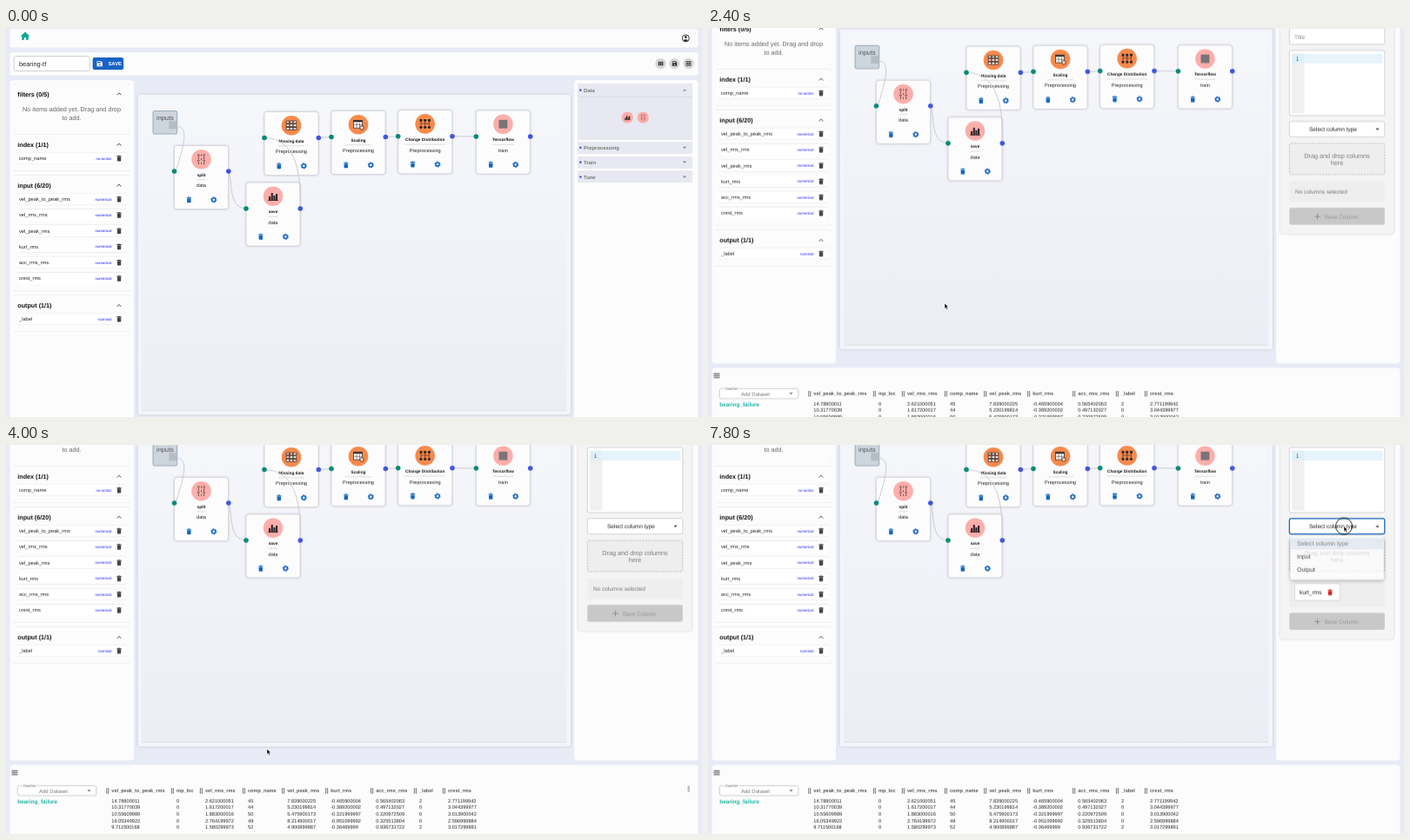
These frames come from a looping animation (800 by 448 pixels, 8000 ms). An HTML page:

```html
<!DOCTYPE html>
<html lang="en">
<head>
<meta charset="utf-8">
<title>Pipeline editor</title>
<style>
html, body { margin: 0; width: 100%; height: 100%; overflow: hidden; background: #e8eaf6; }
svg { display: block; width: 800px; height: 448px; }
text { font-family: "Liberation Sans", Arial, sans-serif; text-rendering: geometricPrecision; white-space: pre; }
.lift { filter: drop-shadow(0 .9px .5px #0004); }
.soft { filter: drop-shadow(0 .6px 1.2px #0003); }
.float { filter: drop-shadow(0 1.5px 2px #0006); }

.page, .pointer, .timed { animation: 8s step-end infinite; }
.page { animation-name: scroll; }
.pointer { animation-name: point; }
.palette { animation-name: palette; }
.form { animation-name: form; }
.empty { animation-name: empty; }
.filled { animation-name: filled; }
.picked { animation-name: picked; }
.ghost { animation-name: ghost; }
.ring { animation-name: ring; }
.arrow { animation-name: arrow; }
.plus { animation-name: plus; }
.bar { animation-name: bar; }
.focus { animation-name: focus; }
.menu { animation-name: menu; }

@keyframes scroll {
  0% { transform: translateY(0); }
  27.5% { transform: translateY(-30px); }
  30% { transform: translateY(-75.3px); }
  32.5% { transform: translateY(-94px); }
  35%, 37.5% { transform: translateY(-99px); }
  40%, 100% { transform: translateY(-98.2px); }
}
@keyframes point {
  0% { transform: translate(830px, 20px); }
  5% { transform: translate(792px, 30px); }
  7.5% { transform: translate(765px, 42px); }
  10% { transform: translate(753px, 42px); }
  15% { transform: translate(600px, 180px); }
  17.5% { transform: translate(300px, 325px); }
  20% { transform: translate(275px, 318px); }
  22.5% { transform: translate(272.6px, 316.7px); }
  30% { transform: translate(272px, 317px); }
  35% { transform: translate(272px, 322px); }
  37.5% { transform: translate(272px, 325px); }
  40% { transform: translate(274px, 328px); }
  50% { transform: translate(300px, 350px); }
  52.5% { transform: translate(345px, 380px); }
  55% { transform: translate(380px, 397px); }
  57.5% { transform: translate(387px, 398px); }
  65% { transform: translate(390px, 396px); }
  67.5% { transform: translate(440.5px, 345.5px); }
  70% { transform: translate(560px, 245px); }
  72.5% { transform: translate(650px, 175px); }
  75% { transform: translate(700px, 140px); }
  77.5% { transform: translate(710px, 134px); }
  87.5% { transform: translate(720px, 115px); }
  90% { transform: translate(728px, 100px); }
  92.5%, 100% { transform: translate(731px, 93.5px); }
}
@keyframes palette { 0% { opacity: 1; } 12.5%, 100% { opacity: 0; } }
@keyframes form { 0% { opacity: 0; } 12.5%, 100% { opacity: 1; } }
@keyframes empty { 0% { opacity: 1; } 80%, 100% { opacity: 0; } }
@keyframes filled { 0% { opacity: 0; } 80%, 100% { opacity: 1; } }
@keyframes picked { 0% { opacity: 0; } 65% { opacity: 1; } 85%, 100% { opacity: 0; } }
@keyframes ghost { 0% { opacity: 0; } 65% { opacity: 1; } 80%, 100% { opacity: 0; } }
@keyframes ring { 0% { opacity: 0; } 10% { opacity: 1; } 12.5% { opacity: 0; } 65% { opacity: 1; } 77.5% { opacity: 0; } 95%, 100% { opacity: 1; } }
@keyframes arrow { 0% { opacity: 1; } 80% { opacity: 0; } 85%, 100% { opacity: 1; } }
@keyframes plus { 0% { opacity: 0; } 80% { opacity: 1; } 85%, 100% { opacity: 0; } }
@keyframes bar { 0% { opacity: 0; } 40% { opacity: 1; } 85%, 100% { opacity: 0; } }
@keyframes focus { 0% { opacity: 0; } 95%, 100% { opacity: 1; } }
@keyframes menu { 0% { opacity: 0; } 97.5%, 100% { opacity: .72; } }
</style>
</head>
<body>
<svg id="stage" viewBox="0 0 800 448"></svg>
<script>
const rect = (x, y, w, h, fill, more = '') => `<rect x="${x}" y="${y}" width="${w}" height="${h}" fill="${fill}" ${more}/>`;
const circle = (x, y, r, fill, more = '') => `<circle cx="${x}" cy="${y}" r="${r}" fill="${fill}" ${more}/>`;
const path = (d, stroke, width = 1, fill = 'none', more = '') => `<path d="${d}" stroke="${stroke}" stroke-width="${width}" fill="${fill}" ${more}/>`;
const timed = (name, body) => `<g class="timed ${name}">${body}</g>`;
// y is the vertical middle of the line
const text = (x, y, s, size, fill = '#222', more = '') => `<text x="${x}" y="${y + size * .35}" font-size="${size}" fill="${fill}" ${more}>${s}</text>`;
const MID = 'text-anchor="middle" ', BOLD = 'font-weight="bold" ';

const trash = (x, y, fill = '#444') => path(`M${x - 2.7} ${y - 2.9}h1.5l.5-.6h1.4l.5.6h1.5v.9h-5.4zM${x - 2.2} ${y - 1.6}h4.4v4.2q0 .8-.8.8h-2.8q-.8 0-.8-.8z`, 'none', 0, fill);
const gear = (x, y) => circle(x, y, 2.1, 'none', 'stroke="#1565c0" stroke-width="1.5"') +
  circle(x, y, 3.1, 'none', 'stroke="#1565c0" stroke-width="1" stroke-dasharray="1.62"');
const chevron = (x, y) => path(`M${x - 2.3} ${y + 1.2}l2.3-2.4 2.3 2.4`, '#333', .9);
const caret = (x, y, dir = 1, fill = '#444') => path(`M${x - 2.2} ${y - dir}h4.4l-2.2 ${2.2 * dir}z`, 'none', 0, fill);
const dots = (x, y, fill = '#333') => [-2.2, 0, 2.2].map(d => circle(x - 1, y + d, .7, fill) + circle(x + 1, y + d, .7, fill)).join('');

const PINK = '#fcaeaa', ORANGE = '#f68a4c', INK = '#2b2326';
const outline = width => `stroke="${INK}" stroke-width="${width}"`;
const glyphs = {
  table: () => [-5.2, -1.4, 2.4].map(y => [-6, -1.9, 2.2].map(x => rect(x, y, 3.8, 2.7, x + y > -4 && x + y < 2 ? '#fff' : '#f6d9c6', outline(.7))).join('')).join(''),
  scaling: () => rect(-5.5, -5, 10, 9, '#fff', outline(.7)) + rect(-5.5, -5, 10, 2, INK) +
    path('M-5 .2h9M-2 -2.4v6M1.4 -2.4v6', INK, .5) + circle(4, 3.8, 2.3, '#ffd9bd', outline(.8)),
  distribution: () => [-4.8, 0, 4.8].map(x => rect(x - 1.5, -5.5, 3, 2.8, INK) + circle(x, 4, 1.6, INK)).join('') +
    path('M-4.8 -2.7v2.4h9.6v-2.4M0 -2.7v5M-4.8 -.3v2.6M4.8 -.3v2.6', INK, .6),
  split: () => [-3.2, 3.2].map(x => [-4.8, -1.6, 1.6, 4.8].map((y, i) =>
    i % 2 ? path(`M${x} ${y - 1.1}v2.2`, INK, .8) : circle(x, y, 1, 'none', outline(.6))).join('')).join('') +
    path('M0 -6v2.4M0 -1.2v2.4M0 3.6v2.4', INK, .6),
  bars: () => path('M-5.8 4.8h11.6', INK, 1) + [[-5, 4.5], [-2.3, 8.5], [.4, 5.5], [3.1, 7.5]].map(([x, h]) => rect(x, 4.8 - h, 2.1, h, INK)).join(''),
  square: () => rect(-5, -5, 10, 10, '#7b7378')
};
const badge = (x, y, r, fill, kind) => circle(x, y, r, fill) + `<g transform="translate(${x} ${y}) scale(${r / 11.5})">${glyphs[kind]()}</g>`;

function node(x, y, title, sub, fill, kind, rule) {
  const c = x + 31;
  return rect(x, y, 62, 73, '#fcfcfd', 'rx="3" stroke="#d3d5dc" stroke-width=".8" class="soft"') +
    badge(c, y + 15.7, 11.3, fill, kind) +
    text(c, y + 33.6, title, 4.75, '#111', MID + BOLD) +
    path(`M${c - rule} ${y + 39.3}h${rule * 2}`, '#c4c4c8', .6) +
    text(c, y + 46, sub, 5.64, '#222', MID) +
    trash(x + 16.8, y + 62.3, '#1565c0') + gear(x + 45.3, y + 62.3);
}
const ports = (x, y) => circle(x, y, 2.8, '#078a74') + circle(x + 62.3, y, 2.8, '#3f55e0');

function item(y, name, kind) {
  return rect(13, y - 7, 125, 13.5, '#fff', 'rx="2" class="lift"') + text(15, y, name, 5.7) +
    text(121.5, y, kind, 4.4, '#1a1aff', 'text-anchor="end"') + trash(130, y);
}
const section = (y, h, title) => rect(9, y, 133, h, '#fcfcfd', 'rx="2" class="lift"') +
  text(13.3, y + 12, title, 7.2, '#111', BOLD) + chevron(130, y + 12);

function leftPanel() {
  const columns = ['vel_peak_to_peak_rms', 'vel_rms_rms', 'vel_peak_rms', 'kurt_rms', 'acc_rms_rms', 'crest_rms'];
  return rect(4.5, 60, 142.5, 401.5, '#fcfcfd', 'rx="4"') +
    section(64, 54, 'filters (0/5)') +
    text(75.5, 93, 'No items added yet. Drag and drop', 7.25, '#666', MID) +
    text(75.5, 103.5, 'to add.', 7.25, '#666', MID) +
    section(122.3, 42.5, 'index (1/1)') + item(150.2, 'comp_name', 'no-action') +
    section(169.3, 133.5, 'input (6/20)') + columns.map((c, i) => item(197.2 + i * 18.25, c, 'numerical')).join('') +
    section(307.7, 42, 'output (1/1)') + item(335.2, '_label', 'nominal');
}

function header() {
  const bar = (y, h) => rect(4.5, y, 791, h, '#fcfcfd', 'rx="3"');
  const tools = [752.5, 768.5, 784.5].map(x => circle(x, 41, 6.2, '#d8d8da')).join('');
  return bar(1, 21.5) + bar(28, 26.5) +
    path('M22 4.6l-5.4 4.8h1.6v4.4h2.7v-2.8h2.2v2.8h2.7v-4.4h1.6z', 'none', 0, '#0fa896') +
    circle(781.3, 11.8, 4, '#fff', 'stroke="#333" stroke-width="1"') + circle(781.3, 10.5, 1.4, '#333') +
    path('M778.6 14.2q2.7-2.4 5.4 0q-2.7 2.6-5.4 0z', 'none', 0, '#333') +
    rect(9.3, 32.5, 87, 17, '#fff', 'rx="2" stroke="#c8c8cc" stroke-width=".8"') + text(15, 41, 'bearing-tf', 7.4) +
    rect(99.7, 34, 35.3, 14, '#1764c4', 'rx="2" class="soft"') +
    path('M104.5 38.2h4.8l1.5 1.5v4.6h-6.3z', 'none', 0, '#fff') + rect(105.2, 39, 3.6, 1.4, '#1764c4') + circle(107.6, 42.5, .9, '#1764c4') +
    text(117.4, 41.1, 'SAVE', 5.9, '#fff', BOLD) + tools +
    [749.8, 751.8, 753.8].map(x => rect(x, 38.7, 1.5, 4.6, '#333')).join('') +
    path('M765.8 38.3h4l1.4 1.4v4h-5.4z', 'none', 0, '#333') + rect(766.4, 39, 3, 1.2, '#d8d8da') + circle(768.5, 42.2, .8, '#d8d8da') +
    [782, 785].map(x => [38.5, 41.5].map(y => rect(x, y, 2, 2, 'none', 'stroke="#333" stroke-width=".7"')).join('')).join('');
}

function board() {
  const edge = d => path(d, '#cbcdd3', 1);
  return rect(151.5, 76.5, 497.5, 369, '#f4f5fa', 'rx="3" class="soft"') +
    rect(156, 81, 488, 359.5, 'url(#sheet)', 'class="lift"') +
    rect(169, 95.5, 27.7, 26.5, '#cdd5dd', 'rx="1.5" stroke="#93a3b2" stroke-width=".9"') +
    rect(187.3, 107.3, 9, 9, '#b5bcc5') + text(173, 103.7, 'inputs', 7.4, '#555') +
    node(193.5, 135.5, 'split', 'data', PINK, 'split', 5) +
    node(276, 178, 'save', 'data', PINK, 'bars', 5.5) +
    node(297, 96.5, 'Missing data', 'Preprocessing', ORANGE, 'table', 15) +
    node(374, 95.5, 'Scaling', 'Preprocessing', ORANGE, 'scaling', 15) +
    node(450.7, 94.7, 'Change Distribution', 'Preprocessing', ORANGE, 'distribution', 23) +
    node(540.4, 95, 'Tensorflow', 'train', PINK, 'square', 12) +
    edge('M196 113C212 114 202 140 198 156Q196 163 193.5 165') +
    edge('M256 165C261 178 255 207 276 208') +
    edge('M338 208C340 160 330 127 297 126.5') +
    edge('M359 126.5L374 125.5M436 125.5L450.7 124.7M513 124.7L540.4 125') +
    ports(193.5, 165) + ports(276, 208) + ports(297, 126.5) + ports(374, 125.5) + ports(450.7, 124.7) + ports(540.4, 125);
}

function palette() {
  const fold = (y, h, name, mid, dir = 1) => rect(657, y, 132, h, '#e7e8f1', 'rx="1.5" class="lift"') +
    circle(660.3, mid, 1.3, '#5a4fcf') + text(664, mid, name, 5.9, '#777', BOLD) + caret(780, mid, dir, '#888');
  return fold(64, 65, 'Data', 71.6, -1) + rect(657, 79, 132, .6, '#d5d6e0') +
    badge(714.3, 103, 6.6, PINK, 'bars') + badge(732.3, 103, 6.6, PINK, 'split') +
    fold(131, 13.3, 'Preprocessing', 137.7) + fold(148, 13.3, 'Train', 154.6) + fold(164.8, 13.3, 'Tune', 171.5);
}

function form() {
  const box = (y, h, fill, more = '') => rect(668.3, y, 109.5, h, fill, 'rx="2" ' + more);
  const select = (fill, more) => box(182.8, 17.8, fill, more);
  const LINE = 'stroke="#c9c9cc" stroke-width=".8"';
  const tail = (cardEnd, trayHeight, buttonY, content) =>
    rect(657.5, 64, 131, cardEnd - 64, '#f4f4f5', 'rx="2" class="soft"') + box(252, trayHeight, '#eeeeef') + content +
    box(buttonY, 19.5, '#c8c8c9') + path(`M697.3 ${buttonY + 10}h6.4m-3.2-3.2v6.4`, '#8f8f8f', 1) +
    text(708.5, buttonY + 10, 'Save Column', 6.5, '#979797');
  const chip = rect(675, 258.3, 51, 18.5, '#fff', 'rx="2" class="soft"') + text(680, 267.8, 'kurt_rms', 6.5) + trash(715, 267.8, '#e02020');
  return timed('empty', tail(312.5, 23.5, 282.3, text(675, 263.7, 'No columns selected', 6.45, '#777'))) +
    timed('filled', tail(321.7, 32.5, 291.6, chip)) +
    box(75, 19, '#fff', LINE) + text(674, 86, 'Title', 6.5, '#8b8b8b') +
    box(101, 75, '#fff', LINE) + rect(671, 104.5, 14.5, 69, '#f0f0f0') +
    rect(671, 105, 14.5, 11, '#e0eff8') + rect(685.5, 105, 90, 11, '#e7f4fc') + text(677.5, 110.7, '1', 6.8, '#23799b', MID) +
    select('#fff', LINE) + text(718.5, 191.7, 'Select column type', 6.5, '#222', MID) +
    timed('focus', select('none', 'stroke="#1565c0" stroke-width="1.2"')) +
    timed('empty', caret(769.5, 191.7)) +
    timed('filled', caret(769.5, 191.7, 1) + timed('focus', rect(766, 189, 7, 6, '#fff') + caret(769.5, 191.7, -1))) +
    box(208, 36, '#eeeeef', 'stroke="#b5b5b7" stroke-width=".8" stroke-dasharray="2 1.4"') +
    text(723, 222, 'Drag and drop columns', 7.25, '#7a7a7a', MID) + text(723, 230.7, 'here', 7.25, '#7a7a7a', MID) +
    timed('menu', rect(669.3, 203, 107.5, 50.5, '#fff', 'rx="2" class="float"') + rect(669.3, 205, 107.5, 13.5, '#e3ebf4') +
      text(677, 211.7, 'Select column type', 7, '#555') + text(677, 226.8, 'Input', 7, '#111') + text(677, 242, 'Output', 7, '#111'));
}

function table() {
  const columns = [[121.3, 'vel_peak_to_peak_rms'], [196, 'mp_loc'], [229, 'vel_rms_rms'], [278, 'comp_name'], [323.2, 'vel_peak_rms'],
    [373.2, 'kurt_rms'], [425.2, 'acc_rms_rms'], [475, '_label'], [508, 'crest_rms']];
  const rows = [
    '14.78800011 0 2.621000051 45 7.839000225 -0.465900004 0.565402063 2 2.771199942',
    '10.31770039 0 1.617200017 44 5.230199814 -0.389200002 0.497132027 0 3.044399977',
    '10.55609989 0 1.883000016 50 5.475900173 -0.321999997 0.220972509 0 3.013900042',
    '16.05349922 0 2.764199972 49 8.214900017 -0.951099992 0.325513804 0 2.596999884',
    '9.711500168 0 1.580299973 52 4.900899887 -0.36469999 0.936731722 2 3.017299891'];
  return rect(4.5, 466.5, 791, 120, '#fcfcfd', 'rx="4"') + path('M6.5 473.4h7m-7 2.2h7m-7 2.2h7', '#333', .9) +
    rect(13.3, 490.5, 90.5, 11.5, '#fff', 'rx="2" stroke="#c4c4c8" stroke-width=".8"') + rect(19, 489, 16, 3, '#fcfcfd') +
    text(20, 490.5, 'DataSet', 3.9, '#666') + text(38, 496.5, 'Add Dataset', 6, '#777') + caret(95.5, 496.2, 1, '#777') +
    text(13.3, 508.5, 'bearing_failure', 6.4, '#17b3a3', BOLD) +
    timed('picked', rect(366, 492, 46, 9.3, '#bcbcbe', 'rx="1"')) +
    columns.map(([x, name]) => dots(x - 4.6, 496.5) + text(x, 496.5, name, 5.6, '#555', BOLD)).join('') +
    rows.map((row, i) => row.split(' ').map((v, j) => text(columns[j][0], 507.7 + i * 7.7, v, 5.64)).join('')).join('') +
    timed('bar', rect(783.5, 490.5, 2.4, 7.5, '#bdbdc0', 'rx="1.2"'));
}

function pointer() {
  const cross = 'M0 -3.2V3.2M-3.2 0H3.2';
  return timed('ghost', rect(-18.5, -2.7, 47.5, 11, 'url(#fade)', 'rx="1"') + dots(-14.5, 2.7) + text(-9.5, 2.7, 'kurt_rms', 5.6, '#777', BOLD)) +
    timed('ring', circle(0, 0, 9.5, 'none', 'stroke="#111" stroke-width=".9"')) +
    timed('arrow', path('M0 0V6.2L1.4 4.9 2.4 7.3 3.5 6.8 2.5 4.5H4.4z', '#fff', .5, '#000')) +
    timed('plus', path(cross, '#fff', 2.8) + path(cross, '#111', 1.6));
}

document.getElementById('stage').innerHTML = `<defs>
  <linearGradient id="sheet" x1="0" y1="0" x2="0" y2="1"><stop offset="0" stop-color="#f6f7fb"/><stop offset="1" stop-color="#eceef5"/></linearGradient>
  <linearGradient id="fade"><stop offset="0" stop-color="#bbb" stop-opacity=".35"/><stop offset=".5" stop-color="#aaa" stop-opacity=".75"/><stop offset="1" stop-color="#bbb" stop-opacity=".4"/></linearGradient>
</defs>` +
  rect(0, 0, 800, 448, '#e8eaf6') +
  `<g class="page">${header()}${leftPanel()}${board()}${rect(653, 60, 142.5, 401.5, '#fcfcfd', 'rx="4"')}` +
  `${timed('palette', palette())}${timed('form', form())}${table()}</g><g class="pointer">${pointer()}</g>`;
</script>
</body>
</html>
```
